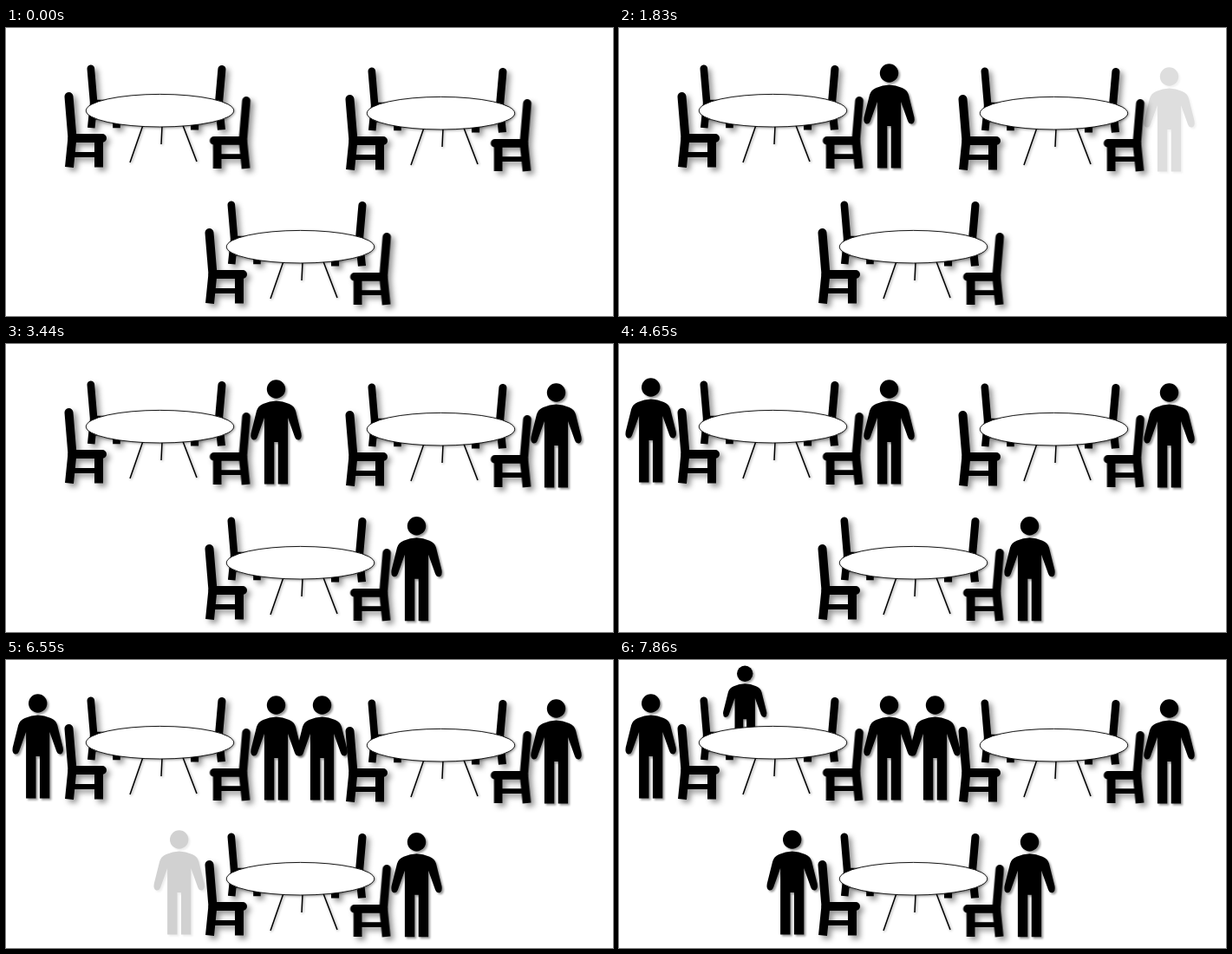
Animation of 700 by 332 pixels, one loop 8 s. Source, as an HTML page:

```html
<!DOCTYPE html>
<html lang="en">
<head>
<meta charset="utf-8">
<title>Tables and guests</title>
<style>
  html, body { margin: 0; width: 100%; height: 100%; overflow: hidden; background: #fff; }
  svg { display: block; width: 700px; height: 332px; }
  .chairs { filter: drop-shadow(4px 4px 3px rgba(0, 0, 0, .42)); }
  .body { filter: drop-shadow(2px 2px 1.2px rgba(0, 0, 0, .4)); }
  .top { filter: drop-shadow(1.5px 1.5px 1.5px rgba(0, 0, 0, .4)); }
</style>
</head>
<body>
<svg viewBox="0 0 700 332">
  <defs>
    <!-- Origin at the chair's upper left corner -->
    <g id="chair" fill="none" stroke="#000" stroke-width="10">
      <path d="M5 5 L9 53 H43.5" stroke-linecap="round" stroke-linejoin="round"/>
      <path d="M9 52 L5.500 86.5 M39.500 54 V86.5"/>
      <path d="M9 72 H38" stroke-width="6"/>
    </g>
    <g id="table">
      <g class="chairs">
        <use href="#chair" transform="translate(93.5 42.5) scale(.86 .84)"/>
        <use href="#chair" transform="translate(253.5 43) scale(-.91 .86)"/>
      </g>
      <g class="top">
        <path d="M158 112 L143 155 M180 113 L179 134 M203.5 111 L220 154" stroke="#000" stroke-width="1.5"/>
        <ellipse cx="177.5" cy="95.2" rx="85.2" ry="18.8" fill="#fff" stroke="#000" stroke-width=".9"/>
      </g>
      <g class="chairs">
        <use href="#chair" transform="translate(67.5 74)"/>
        <use href="#chair" transform="translate(282 79) scale(-.97 .96)"/>
      </g>
    </g>
    <!-- Origin at the centre of the head -->
    <g id="person" class="body">
      <circle r="10.7"/>
      <path d="M-15 17 Q0 10 15 17 Q21 19.500 22.500 25 L29 51 Q30 57 26.500 58.500 Q23 59 21.500 55 L13.600 33 V109.500 H2.200 V61 H-2.200 V109.500 H-13.600 V33 L-21.500 55 Q-23 59 -26.500 58.500 Q-30 57 -29 51 L-22.500 25 Q-21 19.500 -15 17Z"/>
    </g>
    <clipPath id="behindTable"><rect x="100" width="100" height="98"/></clipPath>
  </defs>
  <g id="standing" clip-path="url(#behindTable)"></g>
  <use href="#table"/>
  <use href="#table" x="324" y="3"/>
  <use href="#table" x="162" y="157"/>
  <g id="guests"></g>
</svg>
<script>
const LOOP = 8000;
const LEAD = 65; // the fade is already under way when a guest first shows

const guests = [
  { x: 311.5, y: 52, from: 690, to: 1070 },
  { x: 634.5, y: 56, from: 1830, to: 2270 },
  { x: 473.5, y: 209.7, from: 3100, to: 3440 },
  { x: 36.7, y: 50, from: 4240, to: 4650 },
  { x: 364.5, y: 52, from: 5350, to: 5720 },
  { x: 199.7, y: 207, from: 6550, to: 6850 },
  { x: 145.2, y: 15.7, from: 7550, to: 7860, scale: 0.86, layer: 'standing' }
];

for (const guest of guests) {
  const { x, y, scale = 1, layer = 'guests' } = guest;
  guest.node = document.createElementNS('http://www.w3.org/2000/svg', 'use');
  guest.node.setAttribute('href', '#person');
  guest.node.setAttribute('transform', `translate(${x} ${y}) scale(${scale})`);
  document.getElementById(layer).append(guest.node);
}

function draw(now) {
  const t = now % LOOP;
  for (const { node, from, to } of guests) {
    const progress = (t - from + LEAD) / (to - from + LEAD);
    node.style.opacity = t < from ? 0 : Math.min(1, progress);
  }
  requestAnimationFrame(draw);
}
draw(0);
</script>
</body>
</html>
```
